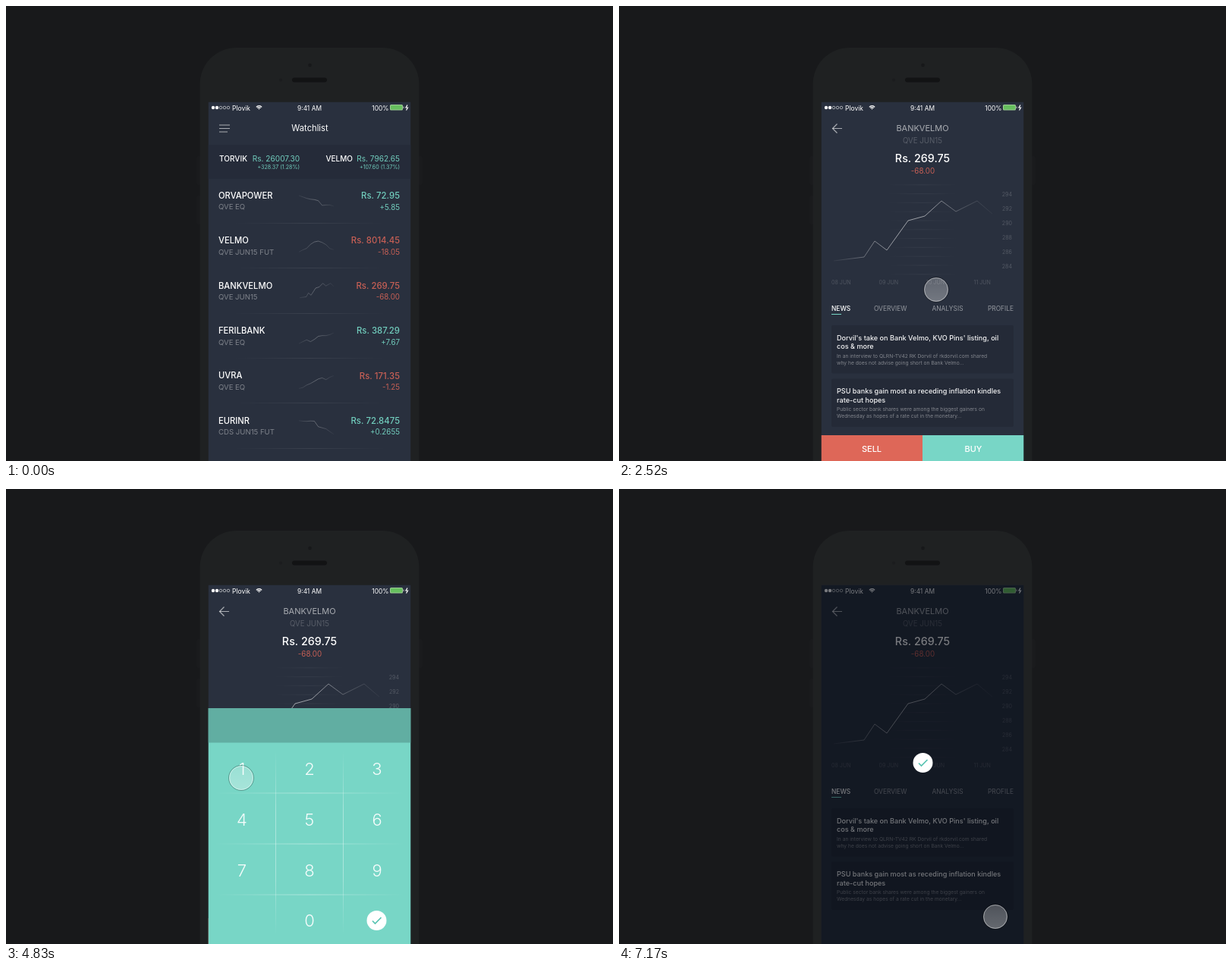
These frames come from a looping animation (800x600 px, 7200 ms). An HTML page with a canvas:

```html
<!DOCTYPE html>
<html lang="en">
<head>
<meta charset="utf-8">
<title>Watchlist</title>
<style>
html, body { margin: 0; width: 100%; height: 100%; overflow: hidden; background: #18191b; }
canvas { display: block; width: 800px; height: 600px; }
</style>
</head>
<body>
<canvas id="stage" width="800" height="600"></canvas>
<script>
const ctx = document.getElementById('stage').getContext('2d');
const LOOP = 7200, MID = 400;
const TEAL = '#78d6c6', RED = '#de6758', UP = '#71cdbd', DOWN = '#c65f55', WHITE = '#fff';
const screen = { x: 266.5, y: 126.5, w: 267, h: 480 };
const KEY_W = screen.w / 3, KEY_H = 66.8;

const white = a => `rgba(255,255,255,${a})`;
const clamp = v => Math.max(0, Math.min(1, v));
const lerp = (a, b, p) => a + (b - a) * p;
const ramp = (t, start, length) => clamp((t - start) / length);
const easeOut = p => 1 - (1 - p) ** 3;
const easeInOut = p => p < .5 ? 4 * p ** 3 : 1 - (2 - 2 * p) ** 3 / 2;
const range = n => [...Array(n).keys()];

function noise(seed) {
  const v = Math.sin(seed * 127.1) * 43758.5;
  return (v - Math.floor(v)) * 2 - 1;
}

function layer(alpha, dx, dy, draw) {
  if (alpha <= 0) return;
  ctx.save();
  ctx.globalAlpha *= alpha;
  ctx.translate(dx, dy);
  draw();
  ctx.restore();
}

// y is the middle of the capital letters
function text(str, x, y, size, color = WHITE, align = 'left', weight = 400) {
  ctx.font = `${weight} ${size}px Inter, Roboto, sans-serif`;
  ctx.textAlign = align;
  ctx.fillStyle = color;
  ctx.fillText(str, x, y + size * .364);
}

function rect(x, y, w, h, color, r = 0) {
  ctx.fillStyle = color;
  ctx.beginPath();
  ctx.roundRect(x, y, w, h, r);
  ctx.fill();
}

const fillScreen = color => rect(screen.x, screen.y, screen.w, screen.h, color);

function disc(x, y, r, fill) {
  ctx.beginPath();
  ctx.arc(x, y, r, 0, Math.PI * 2);
  ctx.fillStyle = fill;
  ctx.fill();
}

function arc(x, y, r, from, to, stroke, width = 1) {
  ctx.beginPath();
  ctx.arc(x, y, r, from, to);
  ctx.strokeStyle = stroke;
  ctx.lineWidth = width;
  ctx.stroke();
}

const ring = (x, y, r, stroke, width) => arc(x, y, r, 0, Math.PI * 2, stroke, width);

function path(points, stroke, width = 1) {
  ctx.beginPath();
  points.forEach(([x, y]) => ctx.lineTo(x, y));
  ctx.strokeStyle = stroke;
  ctx.lineWidth = width;
  ctx.stroke();
}

function fade(x0, y0, x1, y1, ...alphas) {
  const g = ctx.createLinearGradient(x0, y0, x1, y1);
  alphas.forEach((a, i) => g.addColorStop(i / (alphas.length - 1), white(a)));
  return g;
}

// a centred horizontal line that fades out at both ends
const hair = (y, width, alpha) => path([[MID - width / 2, y], [MID + width / 2, y]],
  fade(MID - width / 2, 0, MID + width / 2, 0, 0, alpha, 0));

const chart = [[283,336], [323,331], [337,310], [353,322], [381,283], [403,277], [425,257], [444,271], [472,257], [492,274]];

// price curve through start, middle and end heights, roughened by seeded noise
function wave(seed, start, mid, end) {
  return range(10).map(i => {
    const p = i / 9;
    const y = p < .5 ? lerp(start, mid, p * 2) : lerp(mid, end, p * 2 - 1);
    return [386 + 46 * p, y + 3.5 * noise(seed + i) * Math.sin(Math.PI * p)];
  });
}

const miniChart = chart.map(([x, y]) => [lerp(387, 432, (x - 283) / 209), lerp(16, -3, (336 - y) / 79)]);

const rows = [
  ['ORVAPOWER', 'QVE EQ', '72.95', '+5.85', wave(4, 0, 8, 14)],
  ['VELMO', 'QVE JUN15 FUT', '8014.45', '-18.05', wave(2, 15, 0, 12)],
  ['BANKVELMO', 'QVE JUN15', '269.75', '-68.00', miniChart],
  ['FERILBANK', 'QVE EQ', '387.29', '+7.67', wave(7, 17, 9, 3)],
  ['UVRA', 'QVE EQ', '171.35', '-1.25', wave(3, 17, 7, 0)],
  ['EURINR', 'CDS JUN15 FUT', '72.8475', '+0.2655', wave(5, 0, 3, 18)]
];

function row(i) {
  const [name, sub, price, diff, spark] = rows[i];
  const color = diff[0] === '+' ? UP : DOWN;
  layer(1, 0, 250 + i * 59.35, () => {
    text(name, 280, 0, 11.2, WHITE, 'left', 500);
    text(sub, 280, 15, 9.6, white(.4));
    text('Rs. ' + price, 519, 0, 11.4, color, 'right', 500);
    text(diff, 519, 15, 9.8, color, 'right');
    path(spark, fade(386, 0, 432, 0, .06, .3, .04), .9);
  });
}

const rule = i => hair(286.5 + Math.round(i * 59.35), 200, .08);

function phone() {
  rect(0, 0, 800, 600, '#18191b');
  for (const y of [198, 250]) rect(251, y, 6, 38, '#1a1b1d', 2);
  rect(543, 198, 6, 38, '#1a1b1d', 2);
  rect(255.5, 55, 289, 640, '#1f2122', 48);
  rect(377, 94.5, 46, 6, '#121314', 3);
  disc(400.5, 78, 2.3, '#17181a');
  disc(362, 97.5, 2, '#1b1c1e');
}

function statusBar() {
  for (const i of range(5)) {
    const x = 273 + i * 5;
    i < 2 ? disc(x, 134, 2.2, WHITE) : ring(x, 134, 1.8, white(.8), .7);
  }
  text('Plovik', 298, 134.5, 8.5);
  for (const r of [.8, 2.8, 4.8]) arc(333.5, 136.5, r, -Math.PI * .77, -Math.PI * .23, WHITE, 1.3);
  text('9:41 AM', MID, 134.5, 8.4, WHITE, 'center');
  text('100%', 504.5, 134.5, 8.4, WHITE, 'right');
  rect(506, 130, 17, 7.5, '#9ccb94', 1.5);
  rect(507, 131, 15, 5.5, '#66bf5e', 1);
  rect(523.5, 132.5, 1, 2.5, white(.7));
  path([[529, 130.5], [527, 134], [529.5, 134], [527.5, 137.5]], WHITE, 1.2);
}

function index(name, price, diff, nameRight, right) {
  text(name, nameRight, 201, 10, WHITE, 'right', 500);
  text('Rs. ' + price, right, 201, 10.1, UP, 'right');
  text(diff, right, 212, 7.1, UP, 'right');
}

function listHeader() {
  statusBar();
  for (const i of range(3)) path([[281, 157 + i * 4.5], [i < 2 ? 295 : 292, 157 + i * 4.5]], white(.6), 1.2);
  text('Watchlist', 400.5, 161, 11.2, WHITE, 'center');
  rect(screen.x, 183, screen.w, 45, '#252b39');
  index('TORVIK', '26007.30', '+328.37 (1.28%)', 318, 387);
  index('VELMO', '7962.65', '+107.60 (1.37%)', 457, 519);
}

// the list splits at the tapped row: rows above go up, rows below go down
function list(t) {
  const p = easeOut(ramp(t, 1500, 600));
  if (p >= 1) return;
  const part = (shift, ids, draw) => layer(1, 0, shift * p, () => {
    if (draw) draw();
    ids.forEach(row);
    layer(1 - p, 0, 0, () => ids.forEach(rule));
  });
  part(-228, [0, 1], listHeader);
  part(205, [3, 4, 5]);
  layer(1 - ramp(t, 1510, 245), 0, 0, () => { row(2); rule(2); });
}

function card(y, title, body) {
  rect(280, y, 240, 63.5, '#242a37', 2);
  title.forEach((s, i) => text(s, 287, y + 16.3 + i * 11.6, 9.1, white(.95), 'left', 500));
  body.forEach((s, i) => text(s, 287, y + 40.5 + i * 8.7, 6.7, white(.43)));
}

function detail() {
  text('QVE JUN15', MID, 177, 9.7, white(.22), 'center');
  text('Rs. 269.75', MID, 201, 14.3, WHITE, 'center', 500);
  text('-68.00', 400.5, 217, 9.8, DOWN, 'center');
  for (const i of range(11)) hair(235.8 + i * 11.8, 92, .05);
  path(chart, fade(283, 0, 494, 0, .05, .35, .62, .58, .22, .04), .9);
  for (const i of range(6)) text(String(294 - 2 * i), 518, 248 + i * 19, 7.1, white(.2), 'right');
  for (const i of range(4)) text(String(8 + i).padStart(2, '0') + ' JUN', 280 + i * 62.5, 364, 7.1, white(.18));

  text('NEWS', 280, 399, 8.4, WHITE, 'left', 500);
  text('OVERVIEW', 336, 399, 8.4, white(.5));
  text('ANALYSIS', 412.5, 399, 8.4, white(.5));
  text('PROFILE', 520, 399, 8.4, white(.5), 'right');
  rect(280, 406, 13, 1, TEAL);
  card(421, ["Dorvil's take on Bank Velmo, KVO Pins' listing, oil", 'cos & more'],
    ['In an interview to QLRN-TV42 RK Dorvil of rkdorvil.com shared',
      'why he does not advise going short on Bank Velmo...']);
  card(491.5, ['PSU banks gain most as receding inflation kindles', 'rate-cut hopes'],
    ['Public sector bank shares were among the biggest gainers on',
      'Wednesday as hopes of a rate cut in the monetary...']);
}

function detailHeader() {
  statusBar();
  path([[294, 161.5], [281.5, 161.5]], white(.6), 1.2);
  path([[287.5, 155.5], [281.5, 161.5], [287.5, 167.5]], white(.6), 1.2);
  text('BANKVELMO', MID, 161, 11, white(.6), 'center');
}

const keyX = i => MID + (i % 3 - 1) * KEY_W;
const keyY = i => 369 + Math.floor(i / 3) * KEY_H;

function keypad() {
  for (const i of range(9)) text(String(i + 1), keyX(i), keyY(i), 22, white(.92), 'center', 300);
  text('0', MID, keyY(10), 22, white(.92), 'center', 300);
  for (const i of range(3)) hair(401 + i * 67, 250, .42);
  for (const side of [-.5, .5]) {
    const x = MID + side * KEY_W;
    path([[x, 345], [x, 588]], fade(0, 345, 0, 588, 0, .38, .38, 0));
  }
}

// each tap: time and place; the pointer arrives just before it
const taps = [
  [1460, 418, 374],
  [3020, 513.5, 585],
  ...range(3).map(i => [4950 + i * 390, keyX(i) + (i - 1) - 2, 379]),
  [6130, 496, 564]
];

function actions(t) {
  if (t < 1850 || t >= 6700) return;
  const half = screen.w / 2;
  const shift = half * easeInOut(ramp(t, 3197, 500));
  const y = 566 - 277 * easeInOut(ramp(t, 3959, 600));
  const enter = 36 * (1 - easeOut(ramp(t, 1850, 370)));
  const drop = 320 * easeInOut(ramp(t, 6250, 430));
  layer(1, 0, enter + drop, () => {
    rect(screen.x - shift, 566, half, 40, RED);
    text('SELL', 333 - shift, 584, 11, WHITE, 'center', 500);
    rect(MID - shift, y, half + shift, 700 - y, TEAL);
    layer(1 - ramp(t, 3030, 140), 0, 0, () => text('BUY', 467, 584, 11, WHITE, 'center', 500));
    layer(ramp(t, 3120, 130) * (1 - ramp(t, 3850, 150)), 0, 0, () => {
      const a = (t - 3330) / 700 * Math.PI * 2;
      arc(MID, 583.5, 6, a + .55, a + Math.PI * 2 - .55, white(.85), 1.2);
    });
    layer(ramp(t, 4500, 180), 0, 0, () => {
      rect(screen.x, 289, screen.w, 45.5, '#61aea2');
      const typed = taps.slice(2, 5).filter(([time]) => t >= time).length;
      text('123'.slice(0, typed), 400.5, 311, 20.5, WHITE, 'center', 500);
    });
    layer(easeInOut(ramp(t, 4130, 470)), 0, 0, keypad);
  });
}

function confirm(t) {
  const p = easeInOut(ramp(t, 6250, 430));
  layer(ramp(t, 4450, 250), lerp(488.5, 400.5, p), lerp(569, 361, p), () => {
    disc(0, 0, 13, WHITE);
    path([[-5.5, .5], [-2, 4], [6, -4]], '#58c3b2', 1.7);
  });
}

function cursor(t) {
  let x = 440, y = 425, r = 16;
  for (const [time, tx, ty] of taps) {
    const p = easeInOut(ramp(t, time - 370, 290));
    x = lerp(x, tx, p);
    y = lerp(y, ty, p);
    r -= 2.5 * clamp(1 - Math.abs(t - time) / 50);
  }
  layer(ramp(t, 850, 250), x, y, () => {
    ring(0, 0, r + .5, 'rgba(0,0,0,.28)');
    disc(0, 0, r, fade(0, -r, 0, r, .25, .35));
    ring(0, 0, r - .6, white(.42));
  });
}

function draw(t) {
  phone();
  ctx.save();
  ctx.beginPath();
  ctx.rect(screen.x, screen.y, screen.w, screen.h);
  ctx.clip();
  fillScreen('#29303e');
  list(t);
  layer(ramp(t, 1530, 210), 0, 0, detail);
  layer(ramp(t, 1800, 300), 0, 0, detailHeader);
  actions(t);
  layer(.53 * ramp(t, 6300, 400), 0, 0, () => fillScreen('#00040c'));
  confirm(t);
  cursor(t);
  ctx.restore();
}

const start = performance.now();
function frame(now) {
  draw(Math.max(0, now - start) % LOOP);
  requestAnimationFrame(frame);
}
draw(0);
requestAnimationFrame(frame);
</script>
</body>
</html>
```
